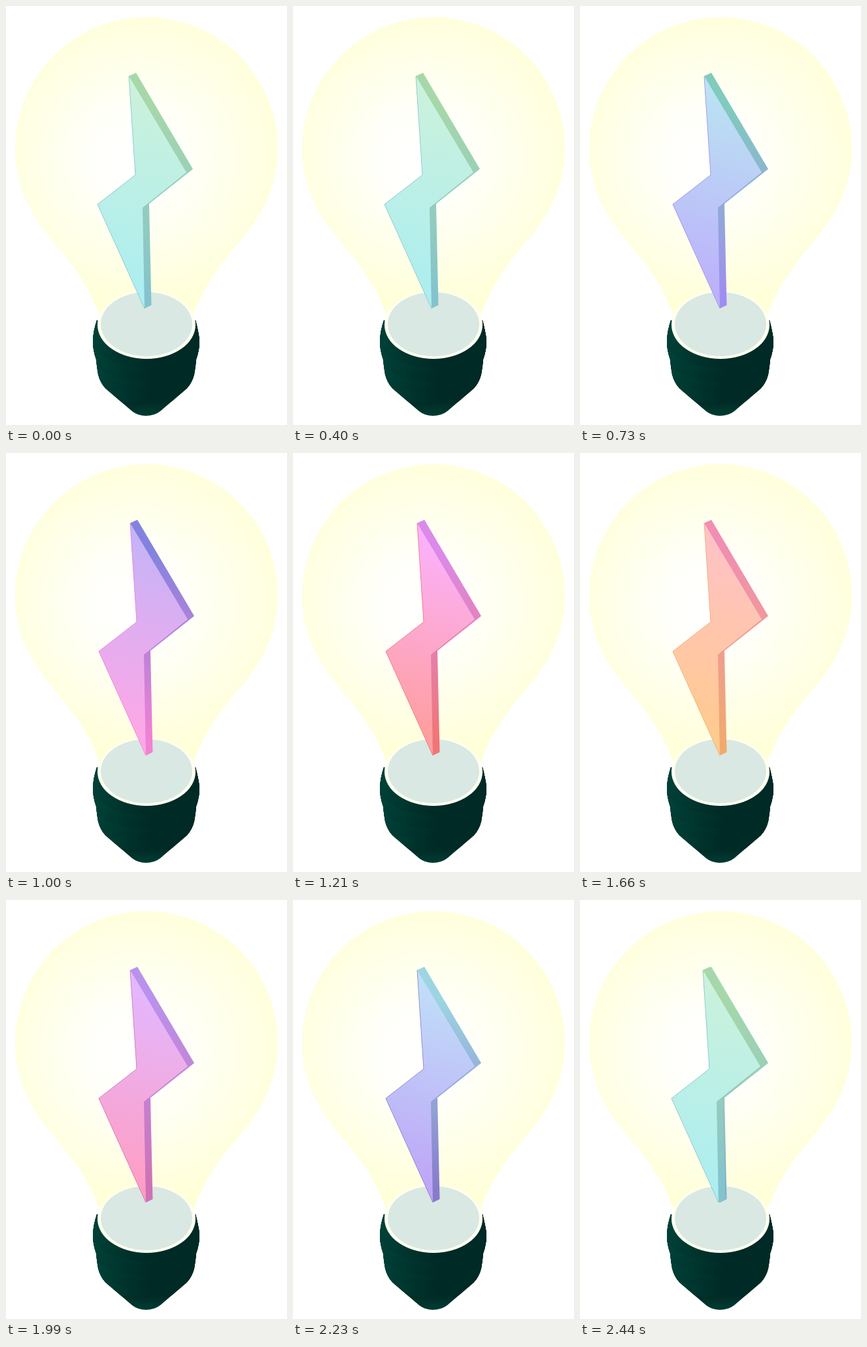
Animation of 430 by 640 pixels, one loop 2540 ms. Source, as an HTML page with a canvas:

```html
<!DOCTYPE html>
<html lang="en">
<head>
<meta charset="utf-8">
<title>Light bulb</title>
<style>
html, body { margin: 0; width: 100%; height: 100%; overflow: hidden; background: #fff; }
canvas { display: block; }
</style>
</head>
<body>
<canvas id="stage" width="430" height="640"></canvas>
<script>
const ctx = document.getElementById('stage').getContext('2d');
const LOOP = 2540, START = 400, END = 2440, STEP = 30;

// Each row: time, then hue, saturation, lightness of
// front top, front bottom, side top, side bottom.
const REST = [147, 59, 87, 182, 69, 81, 122, 38, 75, 188, 42, 66];
const KEYS = [
  [START, ...REST],
  [730, 197, 69, 84, 249, 90, 84, 168, 42, 65, 250, 77, 75],
  [1210, 300, 90, 84, 360, 100, 81, 290, 70, 73, 360, 80, 70],
  [1660, 356, 100, 88, 392, 100, 78, 338, 76, 75, 387, 81, 69],
  [1990, 276, 100, 86, 336, 100, 81, 266, 71, 75, 317, 50, 63],
  [END, ...REST]
];

const BULB = new Path2D('M147 485C140 460 128 435 112 411C98 390 82 371 66 352' +
  'C34 314 14 270 14 218A201 201 0 0 1 416 218C416 270 396 314 364 352' +
  'C348 371 332 390 318 411C302 435 290 460 283 485Z');
const BASE = new Path2D('M139 480C135 492 133 503 133 513Q133 526 138 540Q139 553 141 563' +
  'Q144 575 152 584L193 619Q202 626 214 626Q227 626 236 619L277 584' +
  'Q285 575 288 563Q290 553 291 540Q296 526 296 513Q296 503 290 480Z');
const FRONT = new Path2D('M188 107L276 254L209 308L212 462L140 303L198 258Z');
const SIDE = new Path2D('M188 107L199 102L286 249L219 302L222.5 457L212 462L140 303L198 258Z');

function colorsAt(t) {
  t = Math.min(END, Math.max(START, t));
  let i = 0;
  while (i < KEYS.length - 2 && t >= KEYS[i + 1][0]) i++;
  const a = KEYS[i], b = KEYS[i + 1], span = b[0] - a[0], u = (t - a[0]) / span;
  const slope = (k, n) => {
    const p = KEYS[Math.max(0, k - 1)], q = KEYS[Math.min(KEYS.length - 1, k + 1)];
    return (q[n] - p[n]) / (q[0] - p[0]) * span;
  };
  const value = n => {
    const d = b[n] - a[n], m0 = slope(i, n), m1 = slope(i + 1, n);
    return a[n] + u * (m0 + u * (3 * d - 2 * m0 - m1 + u * (m0 + m1 - 2 * d)));
  };
  return [1, 4, 7, 10].map(n => `hsl(${value(n)},${value(n + 1)}%,${value(n + 2)}%)`);
}

function linear(x0, y0, x1, y1, from, to) {
  const g = ctx.createLinearGradient(x0, y0, x1, y1);
  g.addColorStop(0, from);
  g.addColorStop(1, to);
  return g;
}

function ellipse(x, y, rx, ry, fill) {
  ctx.beginPath();
  ctx.ellipse(x, y, rx, ry, 0, 0, 2 * Math.PI);
  ctx.fillStyle = fill;
  ctx.fill();
}

function drawBase() {
  ctx.save();
  ctx.clip(BASE);
  ctx.fillStyle = linear(0, 595, 0, 626, '#00241f', '#003c33');
  ctx.fillRect(130, 470, 170, 160);
  // Threads, lowest first, so each one overlaps the next below
  for (const [edge, bottom] of [[587, 607], [565, 592], [541, 573], [514, 552]]) {
    ctx.beginPath();
    ctx.moveTo(130, 470);
    ctx.lineTo(130, edge);
    ctx.bezierCurveTo(152, bottom + (bottom - edge) / 3, 278, bottom + (bottom - edge) / 3, 300, edge);
    ctx.lineTo(300, 470);
    ctx.fillStyle = linear(150, edge - 15, 215, bottom, '#004036', '#002a25');
    ctx.fill();
  }
  ctx.restore();
}

function drawBulb() {
  const glow = ctx.createRadialGradient(195, 235, 0, 208, 228, 235);
  glow.addColorStop(0, '#fff');
  glow.addColorStop(0.3, '#fffffa');
  glow.addColorStop(0.65, '#ffffe9');
  glow.addColorStop(1, '#ffffd8');
  ctx.fillStyle = glow;
  ctx.fill(BULB);
  ellipse(215, 487, 75, 52, '#fffff0');
  ellipse(215, 486, 70, 49, '#d9e8e2');
}

function drawBolt(x, [top, bottom, sideTop, sideBottom]) {
  ctx.save();
  ctx.translate(x, 0);
  ctx.fillStyle = linear(0, 150, 0, 440, sideTop, sideBottom);
  ctx.fill(SIDE);
  ctx.fillStyle = linear(245, 140, 170, 425, top, bottom);
  ctx.fill(FRONT);
  ctx.beginPath();
  ctx.moveTo(188, 107);
  for (const p of [[198, 258], [140, 303], [212, 462]]) ctx.lineTo(...p);
  ctx.strokeStyle = sideBottom;
  ctx.lineWidth = 0.8;
  ctx.stroke();
  ctx.restore();
}

function frame(now) {
  const t = now % LOOP;
  const tick = START + Math.floor((t - START) / STEP) * STEP;
  ctx.fillStyle = '#fff';
  ctx.fillRect(0, 0, 430, 640);
  drawBase();
  drawBulb();
  // The previous pose still shows behind the bolt as it snaps back
  if (t >= END) drawBolt(2, colorsAt(END - 2 * STEP));
  const shifted = t >= START + STEP && t < END;
  drawBolt(shifted ? 2 : 0, colorsAt(tick));
  requestAnimationFrame(frame);
}

let origin;
requestAnimationFrame(function begin(now) {
  origin = now;
  frame(0);
});
const run = frame;
frame = now => run(Math.max(0, now - origin));
</script>
</body>
</html>
```
